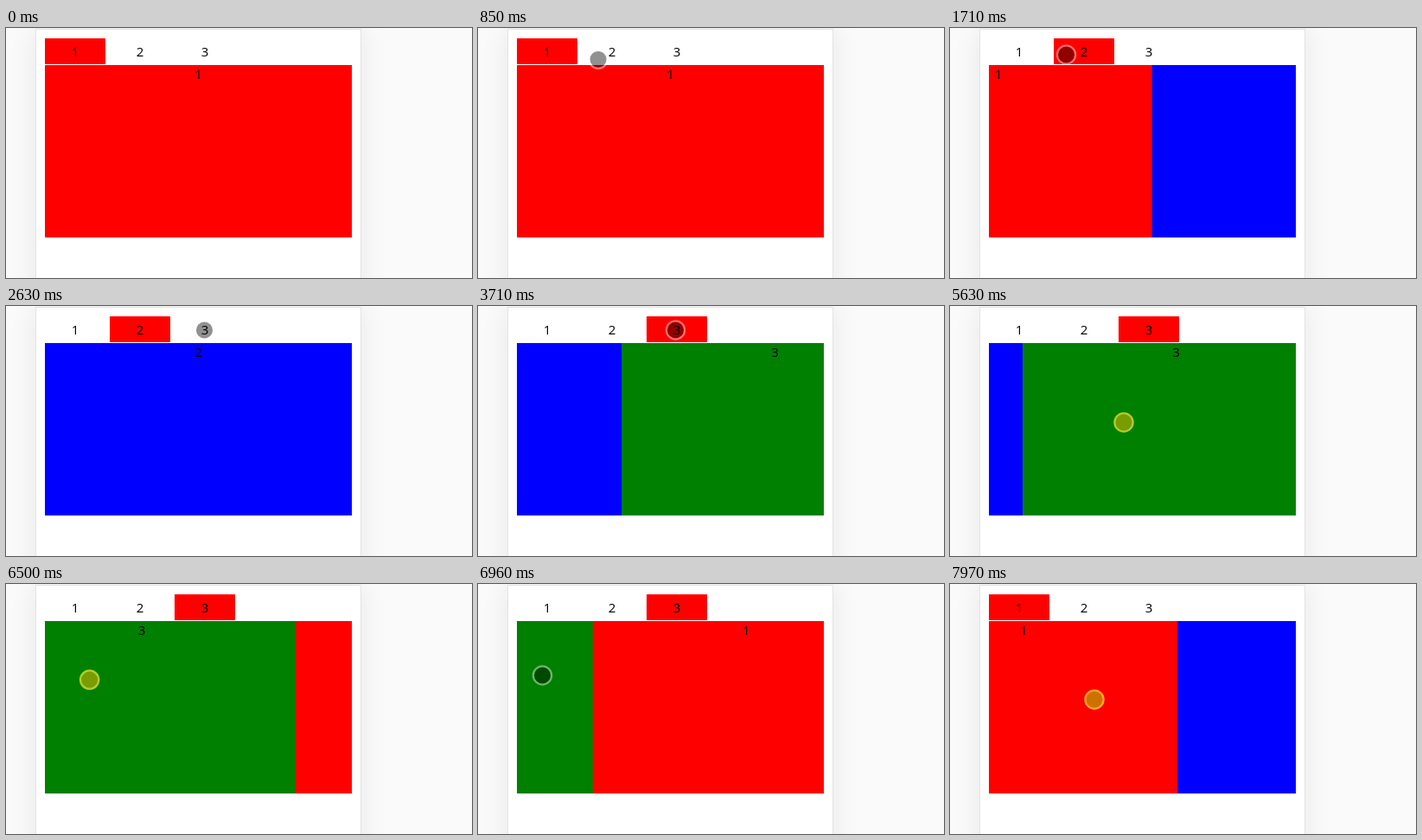
Animation, 539 px wide and 290 px high, one loop 8 s. Source, as an HTML page with a canvas:

```html
<!DOCTYPE html>
<html lang="en">
<head>
<meta charset="utf-8">
<title>Swipe tabs</title>
<style>
  html, body { margin: 0; width: 100%; height: 100%; overflow: hidden; background: #fafafa; }
  canvas { display: block; }
</style>
</head>
<body>
<canvas id="stage" width="539" height="290"></canvas>
<script>
const ctx = document.getElementById('stage').getContext('2d');
const LOOP = 8000, STEP = 77.25, GLIDE = 500;
const VIEW = { x: 45, y: 43, w: 355, h: 200 };
const COLORS = ['#f00', '#00f', '#008000'];

// Finger-down spans of the tap and the two drags
const TAP = { from: 3085, to: 3240 };
const DRAG_A = { from: 5480, to: 6739, x: 162 };
const DRAG_B = { from: 7800, to: LOOP, x: 304 };

// Eased pointer moves, each starting where the previous one ended
const START = { x: 332.5, y: 264.5 };
const MOVES = [
  { from: 70, to: 927, x: 134.5, y: 31 },
  { from: 1780, to: 2400, x: 229.5, y: 28 },
  { from: 3630, to: 4090, x: 216.5, y: 26.5 },
  { from: 4400, to: 4800, x: 286, y: 75 },
  { from: 4800, to: 5480, x: DRAG_A.x, y: 139 },
  { from: 5550, to: 5630, x: 201, y: 135 },
  { from: 5800, to: DRAG_A.to, x: 74.5, y: 106 },
  { from: 6960, to: 7200, x: 38.5, y: 112 },
  { from: 7200, to: 7800, x: DRAG_B.x, y: 137 },
  { from: DRAG_B.from, to: 7956, x: 167, y: 134 }
];

const progress = (t, from, to) => Math.min(1, Math.max(0, (t - from) / (to - from)));
const smooth = k => k * k * (3 - 2 * k);
const during = (t, span) => t >= span.from && t < span.to;

function pointerAt(t) {
  let { x, y } = START;
  for (const move of MOVES) {
    const k = smooth(progress(t, move.from, move.to));
    x += (move.x - x) * k;
    y += (move.y - y) * k;
  }
  return { x, y };
}

// Decelerating slide change from 0 to 1
const glide = (t, start) => 1 - (1 - progress(t, start, start + GLIDE)) ** 2;

// Position in slides; the strip repeats after three
function scrollAt(t) {
  const dragged = drag => (drag.x - pointerAt(Math.min(t, drag.to)).x) / VIEW.w;
  if (t < DRAG_A.from) return glide(t, 1564) + glide(t, 3500);
  if (t >= DRAG_B.from) return 3 + dragged(DRAG_B);
  const offset = dragged(DRAG_A);
  return 2 + offset + (1 - offset) * glide(t, DRAG_A.to);
}

const activeTab = t => t < 1540 ? 0 : t < 3475 ? 1 : t < 7250 ? 2 : 0;

function rect(x, y, w, h, color) {
  ctx.fillStyle = color;
  ctx.fillRect(x, y, w, h);
}

function label(text, x, baseline) {
  ctx.fillStyle = '#000';
  ctx.fillText(text, x, baseline);
}

function drawPage() {
  rect(0, 0, 539, 290, '#fafafa');
  ctx.save();
  ctx.shadowColor = 'rgba(0,0,0,.08)';
  ctx.shadowBlur = 30;
  rect(34, 1, 377, 320, '#e4e4e4');
  ctx.restore();
  rect(35, 2, 375, 300, '#fff');
}

function drawTabs(active) {
  for (let i = 0; i < 3; i++) {
    const x = 45 + i * 75;
    if (i === active) rect(x, 12, 70, 30, '#f00');
    label(i + 1, x + 35, 33);
  }
}

function drawSlides(scroll) {
  ctx.save();
  ctx.beginPath();
  ctx.rect(VIEW.x, VIEW.y, VIEW.w, VIEW.h);
  ctx.clip();
  for (let i = 0; i < 5; i++) {
    const x = VIEW.x + (i - scroll) * VIEW.w;
    rect(x, VIEW.y, VIEW.w + 1, VIEW.h, COLORS[i % 3]); // overlap hides the seam
    label(i % 3 + 1, x + VIEW.w / 2, 59);
  }
  ctx.restore();
}

function drawPointer({ x, y }, pressed) {
  ctx.beginPath();
  ctx.arc(x, y, 9.7, 0, 7);
  ctx.fillStyle = pressed ? 'rgba(180,170,0,.67)' : 'rgba(0,0,0,.43)';
  ctx.fill();
  ctx.beginPath();
  ctx.arc(x, y, 10.6, 0, 7);
  ctx.lineWidth = 2.3;
  ctx.strokeStyle = pressed ? 'rgba(255,235,60,.7)' : 'rgba(255,255,255,.42)';
  ctx.stroke();
}

function render() {
  const now = performance.now() % LOOP;
  const t = Math.floor((now + 12) / STEP) * STEP;
  ctx.font = '15px "Open Sans", "Noto Sans", sans-serif';
  ctx.textAlign = 'center';
  drawPage();
  drawTabs(activeTab(t));
  drawSlides(scrollAt(t));
  if (t > 0) drawPointer(pointerAt(t), [TAP, DRAG_A, DRAG_B].some(span => during(t, span)));
  requestAnimationFrame(render);
}
render();
</script>
</body>
</html>
```
